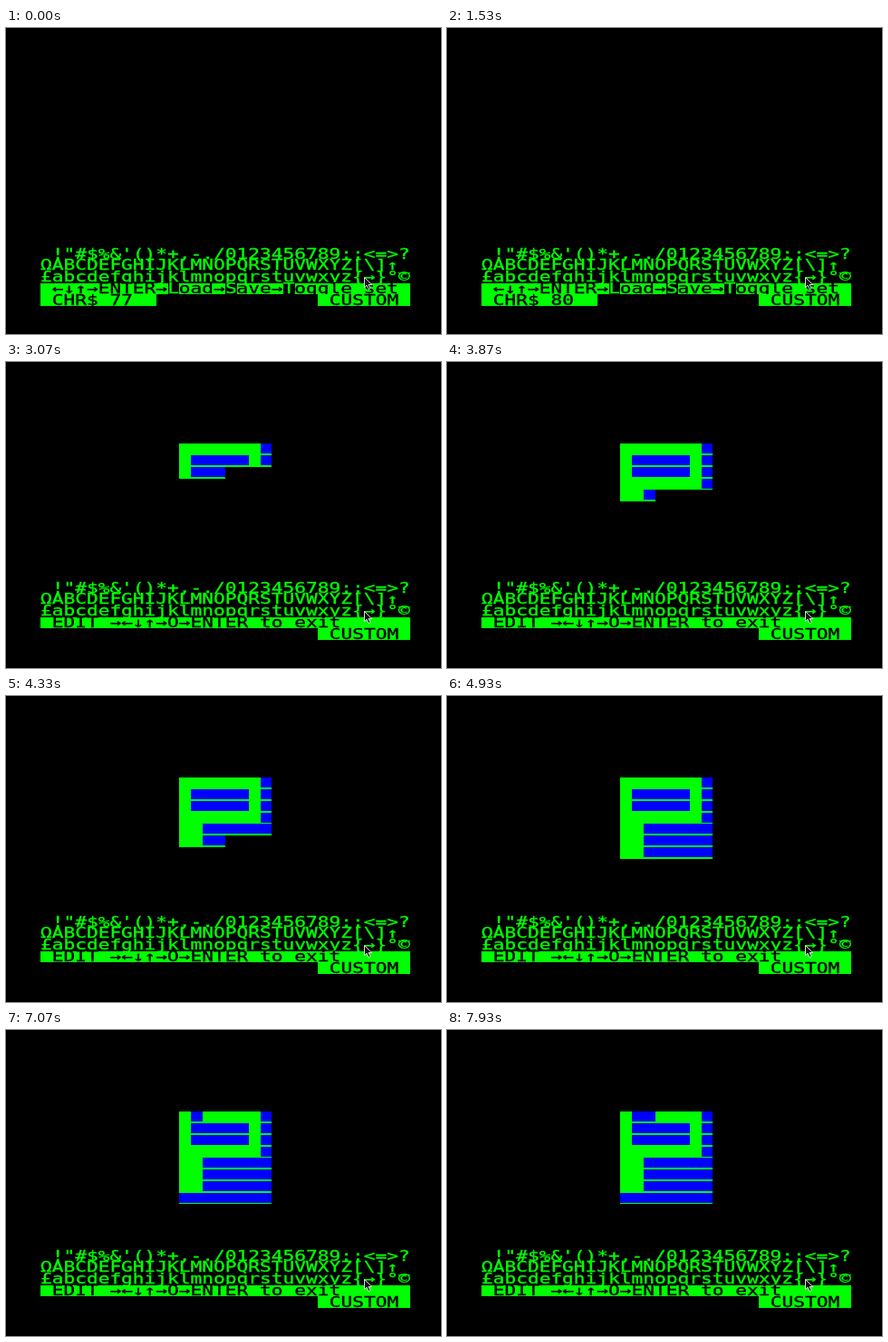
Animation of 480x338 px, one loop 8 s. Source, as an HTML page:

```html
<!DOCTYPE html>
<html lang="en">
<head>
<meta charset="utf-8">
<title>Character editor</title>
<style>
  html, body { margin: 0; width: 100%; height: 100%; overflow: hidden; background: #000; }
  svg { display: block; width: 100vw; height: 100vh; }
  text { font: 15.3px "DejaVu Sans Mono", monospace; white-space: pre; stroke-width: .3; }
  rect { shape-rendering: crispEdges; }
  .lit { fill: #0f0; }
  .dark { fill: #000; }
  .blank { fill: #00f; }
  text.lit { stroke: #0f0; }
  text.dark { stroke: #000; }
  .pointer { fill: #111; stroke: #ddd; stroke-width: 1; }
</style>
</head>
<body>
<svg viewBox="0 0 480 338">
  <g id="screen"></g>
  <path class="pointer" d="M395.5 275.5v11l2.6-2.3 2 4.4 2-.9-2-4.2h3.6z"/>
</svg>
<script>
const LOOP = 8000;
const CELL = 12.75;
const WIDE = 1.384; // the display has wide pixels
const LEFT = 38.4, TOP = 90.3;
const GRID_COLUMN = 12;
const EDIT_START = 1870;
const screen = document.getElementById("screen");

function add(parent, tag, className, attributes = {}) {
  const node = document.createElementNS("http://www.w3.org/2000/svg", tag);
  node.setAttribute("class", className);
  for (const key in attributes) node.setAttribute(key, attributes[key]);
  return parent.appendChild(node);
}

const group = parent => add(parent, "g", "");
const show = (node, visible) => node.setAttribute("visibility", visible ? "inherit" : "hidden");
const cellX = column => LEFT + column * CELL;
const cellY = row => TOP + row * CELL;

function block(parent, className, column, row, columns, height = CELL) {
  return add(parent, "rect", className, {
    x: cellX(column), y: cellY(row), width: columns * CELL, height
  });
}

function print(parent, className, column, row, content) {
  const node = add(parent, "text", className, {
    transform: `translate(${cellX(column) - 0.5} ${cellY(row) + 11.2}) scale(${WIDE} 1)`
  });
  node.textContent = content;
  return node;
}

// One letter on a block of the opposite colour
function inverted(parent, paper, ink, column, row, letter) {
  const node = group(parent);
  block(node, paper, column, row, 1);
  print(node, ink, column, row, letter);
  return node;
}

// Character set
const characters = [
  " !\"#$%&'()*+,-./0123456789:;<=>?",
  "ΩABCDEFGHIJKLMNOPQRSTUVWXYZ[\\]↑_",
  "£abcdefghijklmnopqrstuvwxyz{→}°©"
];
characters.forEach((line, i) => print(screen, "lit", 0, 12 + i, line));

// Selected letter, shown inverted while the cursor blinks
const selections = [..."MNOP"].map((letter, i) =>
  inverted(screen, "lit", "dark", 13 + i, 13, letter));
const selectionTimes = [[70, 270], [330, 530], [670, 870], [1270, 1530]];

// Status bars
block(screen, "lit", 0, 15, 32);
const menuHelp = group(screen);
const menu = " ←↓↑→ENTER→Load→Save→Toggle set";
print(menuHelp, "dark", 0, 15, menu);
for (const key of ["Load", "Save", "Toggle"]) {
  inverted(menuHelp, "dark", "lit", menu.indexOf(key), 15, key[0]);
}
const editHelp = print(screen, "dark", 1, 15, "EDIT →←↓↑→O→ENTER to exit");
const codeBar = group(screen);
block(codeBar, "lit", 0, 16, 10);
const code = print(codeBar, "dark", 1, 16, "CHR$ 77");
block(screen, "lit", 24, 16, 8);
print(screen, "dark", 25, 16, "CUSTOM");

// Enlarged letter P
function inLetter(column, row) {
  if (row === 7 || column === 7) return false;
  if (row > 3) return column < 2;
  return row % 3 === 0 || column === 0 || column === 6;
}

const cells = Array.from({ length: 64 }, (_, i) => {
  const column = i % 8, row = Math.floor(i / 8);
  const node = group(screen);
  block(node, "lit", GRID_COLUMN + column, row, 1);
  const cover = block(node, "blank", GRID_COLUMN + column, row, 1, CELL * 7 / 8);
  return { node, cover, filled: inLetter(column, row) };
});

// Cell index, start and end of each period in which it is cleared
const clearings = [
  [0, 5670, 5930], [1, 6330, 6470], [1, 6670, LOOP],
  [2, 7130, LOOP], [3, 7470, 7930]
];

const between = (time, start, end) => time >= start && time < end;

function cellsDrawn(time) {
  return time < 3870 ? 6.05 + (time - 2270) / 53.6 : 35.9 + (time - 3870) / 52.4;
}

function draw(time) {
  const editing = time >= EDIT_START;
  show(menuHelp, !editing);
  show(editHelp, editing);
  show(codeBar, !editing);
  code.textContent = "CHR$ " + (77 + [270, 600, 1000].filter(start => time >= start).length);
  selections.forEach((node, i) => show(node, between(time, ...selectionTimes[i])));

  const drawn = Math.floor(cellsDrawn(time));
  cells.forEach(({ node, cover, filled }, i) => {
    const cleared = clearings.some(([cell, start, end]) => cell === i && between(time, start, end));
    show(node, i < drawn);
    show(cover, i < drawn && (!filled || cleared));
  });
}

const start = performance.now();
function tick(now) {
  draw(Math.max(0, now - start) % LOOP);
  requestAnimationFrame(tick);
}
draw(0);
requestAnimationFrame(tick);
</script>
</body>
</html>
```
